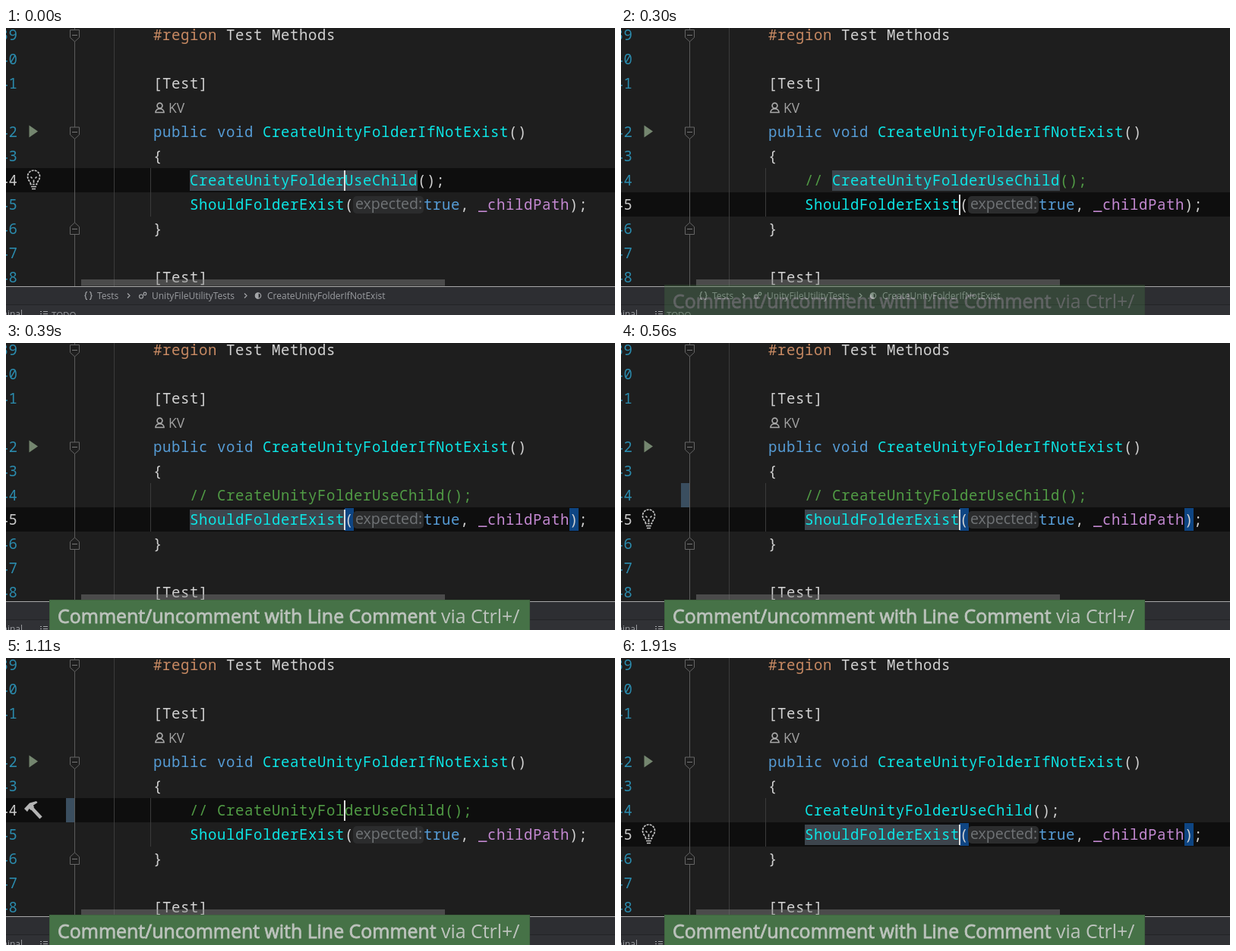
Animation, 802 px wide and 379 px high, one loop 2.21 s. Source, as an HTML page:

```html
<!DOCTYPE html>
<html lang="en">
<head>
<meta charset="utf-8">
<title>Toggle line comment</title>
<style>
  html, body { margin: 0; width: 100%; height: 100%; overflow: hidden; background: #1e1e1e; }
  svg { display: block; width: 802px; height: 379px; }
  text { white-space: pre; font-variant-ligatures: none; }
  .code text { font: 19px "Noto Sans Mono", "DejaVu Sans Mono", monospace; letter-spacing: .6px; fill: #d2d2d2; }
  .ui { font-family: "Open Sans", "Noto Sans", sans-serif; }
  .code .num { fill: #2b8bad; }
  .code .kw { fill: #569cd6; }
  .code .fn { fill: #0ce6e6; }
  .code .field { fill: #c489d2; }
  .code .region { fill: #c88a63; }
  .code .note { fill: #519c45; }
  .crumb { font-size: 12px; fill: #9b9da1; }
  .line { fill: none; stroke: #a4a6a9; stroke-width: 1.2; }
</style>
</head>
<body>
<svg viewBox="0 0 802 379" xmlns="http://www.w3.org/2000/svg">
  <defs>
    <path id="fold" d="M-6 -7.5H6V2.5L0 8L-6 2.5Z" fill="#1e1e1e" stroke="#666"/>
  </defs>

  <rect width="802" height="379" fill="#1e1e1e"/>
  <rect id="row" width="802" height="32" fill="#0e0e0e"/>
  <rect id="mark" x="79" y="185" width="12" height="32" fill="#3a4e5f"/>
  <path d="M90.5 0V341" stroke="#5a5a5a"/>
  <path d="M142.5 0V341M190.5 185V249" stroke="#3b3b3b"/>
  <use href="#fold" x="90.5" y="10"/>
  <use href="#fold" x="90.5" y="138.5"/>
  <use href="#fold" transform="translate(90.5 265) scale(1 -1)"/>
  <path d="M87 9.5h7M87 137.5h7M87 265.5h7" stroke="#777"/>
  <path d="M30.5 128.5L42 136.5L30.5 144.5Z" fill="#74866f"/>

  <rect id="use" height="27" fill="#3d454d"/>
  <path id="pair" d="M446 218h12v30h-12zM742 218h12v30h-12z" fill="#0e4583"/>
  <rect x="457" y="222" width="93" height="23" rx="5" fill="#2b2c2d"/>
  <text class="ui" x="460" y="239" font-size="19.6" fill="#707376">expected:</text>

  <g fill="none" stroke="#a8a8a8" stroke-width="1.7">
    <circle cx="202.5" cy="102.5" r="3.4"/>
    <path d="M197 111.5c0-6.500 11-6.500 11 0z"/>
  </g>
  <text class="ui" x="214" y="112" font-size="17.5" fill="#a3a3a3">KV</text>

  <g class="code" id="code"></g>
  <rect id="caret" x="445" width="2" height="27" fill="#dedede"/>

  <g id="bulb" fill="none" stroke="#c4c4c4" stroke-width="1.7">
    <path d="M-4 6c0-4-4-5-4-10.500a8 8 0 0 1 16 0c0 5.500-4 6.500-4 10.500z" stroke-dasharray="3 1.2"/>
    <path d="M-3.500 9h7M-2.500 12h5M0 4V0M-2-2L-4-4M2-2L4-4"/>
  </g>
  <g id="hammer">
    <path d="M32 196L46 211" stroke="#b4b4b4" stroke-width="4.500"/>
    <path d="M24 199L31 191.500L40 189L41.500 191L36 194.500L37 197L33 201L30.500 199L28 203Z" fill="#b4b4b4"/>
  </g>

  <rect x="99" y="332" width="479" height="8.500" fill="#808080" fill-opacity=".45"/>
  <rect y="341" width="802" height="38" fill="#2d2e32"/>
  <path d="M0 341.500H802" stroke="#a8a8a8"/>
  <path d="M0 365.500H802" stroke="#222326"/>
  <rect y="366" width="802" height="13" fill="#303135"/>

  <g class="line">
    <path d="M107 348.500q-2 0-2 2.500t-1.500 2.500q1.500 0 1.500 2.500t2 2.500M110 348.500q2 0 2 2.500t1.500 2.500q-1.500 0-1.500 2.500t-2 2.500"/>
    <path d="M160 350.500l3 3-3 3M314 350.500l3 3-3 3"/>
    <circle cx="178" cy="354.500" r="2.500"/><circle cx="183" cy="351" r="1.800"/>
    <circle cx="332" cy="353.500" r="3.700"/>
    <path d="M332 350a3.500 3.500 0 0 0 0 7z" fill="#a4a6a9"/>
    <path d="M45 374.500h2M49 374.500h6M45 377.500h2M49 377.500h6"/>
  </g>
  <g class="ui crumb">
    <text x="120" y="358">Tests</text>
    <text x="192" y="358">UnityFileUtilityTests</text>
    <text x="344" y="358">CreateUnityFolderIfNotExist</text>
    <text x="22" y="382" text-anchor="end">Terminal</text>
    <text x="60" y="382.500" font-size="11.500">TODO</text>
  </g>

  <g id="popup" class="ui" font-size="24.900" fill="#bdc3bd">
    <rect x="57.500" y="339.500" width="632" height="44" fill="#467247" stroke="#3f643f"/>
    <text x="68" y="370" stroke="#bdc3bd" stroke-width=".8">Comment/uncomment with Line Comment</text>
    <text x="573" y="370">via Ctrl+/</text>
  </g>
</svg>

<script>
const $ = id => document.getElementById(id);
const CELL = 12, LEFT = 194, LOOP = 2210;
const CYAN = '#0ce6e6', GREEN = '#519c45', PLAIN = '#d2d2d2';
const rowTop = n => 185 + (n - 44) * 32;

function put(str, x, y, cls = '') {
  const t = document.createElementNS('http://www.w3.org/2000/svg', 'text');
  t.setAttribute('x', x);
  t.setAttribute('y', y);
  t.setAttribute('class', cls);
  t.textContent = str;
  $('code').append(t);
  return t;
}

// Places tokens one after another on the cell grid.
function line(y, col, ...tokens) {
  for (const [str, cls] of tokens) {
    put(str, LEFT + col * CELL, y, cls);
    col += str.length;
  }
}

const nums = {};
for (let n = 39; n <= 48; n++) {
  const y = rowTop(n) + 23 - (n < 42 ? 32 : 0);
  nums[n] = put(String(n), -8.5, y, 'num');
}

line(16, 0, ['#region', 'region'], [' Test Methods']);
line(80, 0, ['[Test]']);
line(144, 0, ['public', 'kw'], [' '], ['void', 'kw'], [' '], ['CreateUnityFolderIfNotExist', 'fn'], ['()']);
line(176, 0, ['{']);
line(240, 4, ['ShouldFolderExist', 'fn'], ['(']);
put('true', 550, 240, 'kw');
put(',', 598, 240);
put('_childPath', 622, 240, 'field');
put(');', 742, 240);
line(272, 0, ['}']);
line(336, 0, ['[Test]']);

const slashes = put('//', 242, 208, 'note');
const call = put('CreateUnityFolderUseChild', 242, 208);
const tail = put('();', 542, 208);

// Each step changes only the listed values.
const steps = [
  [0, { row: 44, note: false, fill: CYAN, use: 44, pair: false, bulb: 44, hammer: false, mark: false, pop: 0 }],
  [230, { row: 45, note: true, bulb: 0 }],
  [300, { pop: .36 }],
  [330, { pop: .8 }],
  [360, { pop: 1, pair: true }],
  [390, { use: 45, fill: GREEN }],
  [530, { mark: true }],
  [560, { bulb: 45 }],
  [1040, { row: 44, bulb: 0 }],
  [1080, { use: 0, pair: false }],
  [1110, { hammer: true }],
  [1620, { row: 45, note: false, fill: PLAIN, hammer: false, mark: false }],
  [1690, { pair: true }],
  [1740, { use: 45 }],
  [1800, { fill: CYAN }],
  [1910, { bulb: 45 }]
];

const show = (el, on) => el.style.display = on ? '' : 'none';

function draw(time) {
  const s = {};
  for (const [at, change] of steps) if (at <= time) Object.assign(s, change);

  const x = s.note ? 278 : 242;
  $('row').setAttribute('y', rowTop(s.row));
  $('caret').setAttribute('y', rowTop(s.row) + 3);
  for (const n of [44, 45]) nums[n].style.fill = n === s.row ? '#c8c8c8' : '';

  show(slashes, s.note);
  call.setAttribute('x', x);
  call.style.fill = s.fill;
  tail.setAttribute('x', x + 300);
  tail.style.fill = s.note ? GREEN : PLAIN;

  show($('use'), s.use);
  if (s.use) {
    $('use').setAttribute('x', s.use === 44 ? x : 242);
    $('use').setAttribute('y', rowTop(s.use) + 3);
    $('use').setAttribute('width', s.use === 44 ? 300 : 204);
  }
  show($('bulb'), s.bulb);
  if (s.bulb) $('bulb').setAttribute('transform', `translate(36.5 ${rowTop(s.bulb) + 15.5})`);
  show($('pair'), s.pair);
  show($('hammer'), s.hammer);
  show($('mark'), s.mark);
  $('popup').style.opacity = s.pop;
}

const start = performance.now();
function tick() {
  draw((performance.now() - start) % LOOP);
  requestAnimationFrame(tick);
}
tick();
</script>
</body>
</html>
```
